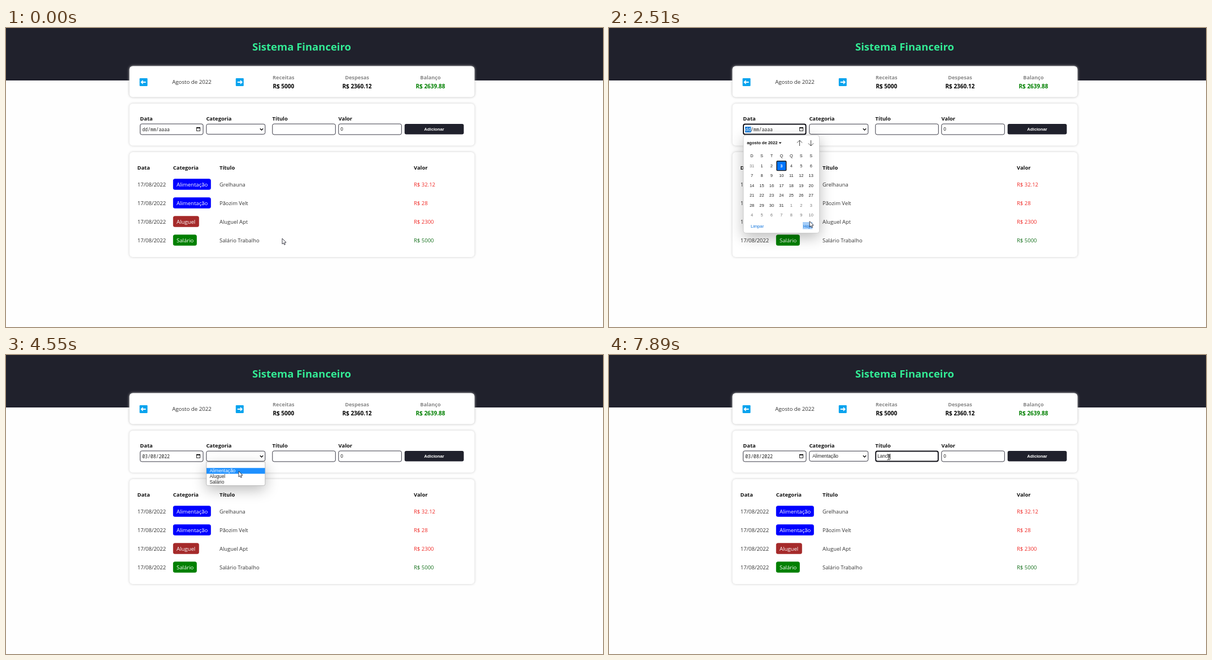
An HTML page with a canvas for the animation above (8000 ms loop, 1057 by 530 pixels).

```html
<!DOCTYPE html>
<html lang="pt">
<head>
<meta charset="utf-8">
<title>Sistema Financeiro</title>
<style>
html, body { margin: 0; width: 100%; height: 100%; overflow: hidden; background: #fefefe; }
canvas { display: block; width: 1057px; height: 530px; }
</style>
</head>
<body>
<canvas id="stage"></canvas>
<script>
const W = 1057, H = 530, LOOP = 8000, STEP = 70;
const canvas = document.getElementById('stage');
const ctx = canvas.getContext('2d');
const dpr = window.devicePixelRatio || 1;
canvas.width = W * dpr;
canvas.height = H * dpr;

const UI = '"Open Sans", "Noto Sans", sans-serif';
const ARIAL = '"Liberation Sans", Arial, sans-serif';
const MONO = '"Noto Sans Mono", monospace';
const DARK = '#20212c', INK = '#111', BLUE = '#0075ff';

// Cursor moves: start, end, destination, optional curve control point
const START = [489, 373];
const MOVES = [
  { a: 320, b: 1080, to: [325, 179] },
  { a: 1150, b: 1290, to: [338.5, 178] },
  { a: 2090, b: 2580, to: [356, 350] },
  { a: 2770, b: 3470, to: [402, 184], via: [352, 280] },
  { a: 4130, b: 4130, to: [402, 190] },
  { a: 4200, b: 4550, to: [412, 206] },
  { a: 5080, b: 5840, to: [494, 181] },
  { a: 5910, b: 5910, to: [495, 181] }
];
const CLICKS = [[1550, 1890], [2580, 2770], [3600, 3670], [5080, 5150], [5700, 5840]];
const TYPED = [[6840, 'L'], [7100, 'a'], [7560, 'n'], [7750, 'c'], [7890, 'h']];
const ROWS = [
  ['Alimentação', 67, '#0000ff', 'Grelhauna', 'R$ 32.12'],
  ['Alimentação', 67, '#0000ff', 'Pãozim Velt', 'R$ 28'],
  ['Aluguel', 46, '#a52a2a', 'Aluguel Apt', 'R$ 2300'],
  ['Salário', 42, '#008000', 'Salário Trabalho', 'R$ 5000']
];

const within = (t, a, b) => t >= a && t < b;
const smooth = k => k * k * (3 - 2 * k);

function text(str, x, y, size, color, { font = UI, weight = 400, align = 'left' } = {}) {
  ctx.font = `${weight} ${size}px ${font}`;
  ctx.textAlign = align;
  ctx.fillStyle = color;
  ctx.fillText(str, x, y);
}

function rect(x, y, w, h, r, fill) {
  ctx.beginPath();
  ctx.roundRect(x, y, w, h, r);
  ctx.fillStyle = fill;
  ctx.fill();
}

function line(points, color, width) {
  ctx.beginPath();
  points.forEach(([x, y]) => ctx.lineTo(x, y));
  ctx.strokeStyle = color;
  ctx.lineWidth = width;
  ctx.stroke();
}

function panel(x, y, w, h, r, shadow, blur, dy = 0) {
  ctx.save();
  ctx.shadowColor = shadow;
  ctx.shadowBlur = blur * dpr;
  ctx.shadowOffsetY = dy * dpr;
  rect(x, y, w, h, r, '#fff');
  ctx.restore();
}

function field(x, y, w, h, focused) {
  const lw = focused ? 1.9 : 1;
  ctx.beginPath();
  ctx.roundRect(x + lw / 2, y + lw / 2, w - lw, h - lw, 3);
  ctx.fillStyle = '#fff';
  ctx.fill();
  ctx.strokeStyle = focused ? '#101018' : '#3a3a46';
  ctx.lineWidth = lw;
  ctx.stroke();
}

function arrowIcon(cx, dir) {
  const cy = 96;
  rect(cx - 7, cy - 7, 14, 14, 1.2, '#08a3ee');
  line([[cx - 4 * dir, cy], [cx + 3 * dir, cy]], '#fff', 2);
  line([[cx + dir, cy - 3], [cx + 4 * dir, cy], [cx + dir, cy + 3]], '#fff', 1.7);
}

function drawSummary() {
  rect(0, 0, W, 93, 0, DARK);
  text('Sistema Financeiro', 523.5, 40, 18.5, '#33eb95', { weight: 700, align: 'center' });
  panel(218.5, 67.5, 611, 55, 6, '#bbb', 4);
  arrowIcon(243.5, -1);
  arrowIcon(413.8, 1);
  text('Agosto de 2022', 329, 99.3, 9.7, '#333', { align: 'center' });
  const totals = [
    [491.3, 'Receitas', 'R$ 5000', '#000'],
    [621.5, 'Despesas', 'R$ 2360.12', '#000'],
    [751.5, 'Balanço', 'R$ 2639.88', '#008000']
  ];
  for (const [x, label, value, color] of totals) {
    text(label, x, 91, 9.2, '#888', { weight: 700, align: 'center' });
    text(value, x, 107.3, 10, color, { weight: 700, align: 'center' });
  }
}

function drawDateField(t) {
  const focused = within(t, 1620, 3600);
  const value = t < 2580 ? 'dd/mm/aaaa' : '03/08/2022';
  field(237, 169.5, 112.5, 20, focused);
  text(value, 241.2, 182.8, 8.15, '#222', { font: MONO });
  if (focused) {
    rect(241, 175, 10.5, 10, 0, '#0f78d8');
    text(value.slice(0, 2), 241.2, 182.8, 8.15, '#fff', { font: MONO });
  }
  ctx.strokeStyle = INK;
  ctx.lineWidth = 0.9;
  ctx.strokeRect(337.5, 176.5, 6, 5.8);
  rect(337, 175.8, 7, 2, 0, INK);
}

function drawForm(t) {
  panel(218.5, 134, 611, 74.5, 6, '#ccc', 4);
  const bold = { weight: 700 };
  text('Data', 237.3, 163.8, 9.4, INK, bold);
  text('Categoria', 354.4, 164.4, 9.4, INK, bold);
  text('Título', 471.6, 163.8, 9.4, INK, bold);
  text('Valor', 588.6, 163.8, 9.4, INK, bold);
  drawDateField(t);

  field(354.3, 169.8, 105, 19, within(t, 5150, 5770));
  if (t >= 5150) text('Alimentação', 360.3, 182.3, 8.3, '#222', { font: ARIAL });
  line([[449.8, 178.2], [452.5, 181], [455.2, 178.2]], INK, 1.4);

  field(471.3, 169.5, 112.5, 20, t >= 5770);
  const typed = TYPED.filter(k => t >= k[0]).map(k => k[1]).join('');
  text(typed, 475.2, 182.4, 8.2, '#222', { font: ARIAL });
  if (within(t, 5770, 6240) || t >= 6840) {
    const caret = 475 + ctx.measureText(typed).width;
    rect(caret, 175, 0.9, 10, 0, INK);
  }

  field(588.3, 169.5, 112.5, 20, false);
  text('0', 592.2, 182.4, 8.2, '#222', { font: ARIAL });
  rect(705.7, 170, 104.8, 18.5, 3, DARK);
  text('Adicionar', 758, 182.2, 7.7, '#fff', { font: ARIAL, weight: 700, align: 'center' });
}

function drawTable() {
  panel(218.5, 220, 611, 186, 6, '#ccc', 4);
  const heads = [['Data', 232.5], ['Categoria', 295.8], ['Título', 378], ['Valor', 722]];
  for (const [label, x] of heads) text(label, x, 251, 9.4, INK, { weight: 700 });
  ROWS.forEach(([kind, width, color, title, value], i) => {
    const y = 281 + 33 * i;
    text('17/08/2022', 232.7, y, 9.5, '#333');
    rect(295.8, y - 13.7, width, 19.5, 3.5, color);
    text(kind, 302, y, 9.55, '#fff');
    text(title, 378, y, 9.4, '#333');
    text(value, 722, y, 9.5, i < 3 ? '#f02a26' : '#14701c');
  });
}

function drawCalendar(t) {
  panel(238, 190, 134.5, 173.5, 4, 'rgba(0,0,0,.28)', 24, 7);
  ctx.strokeStyle = '#c4c4c4';
  ctx.lineWidth = 0.7;
  ctx.stroke();
  text('agosto de 2022', 244.2, 206.2, 7.5, INK, { font: ARIAL, weight: 700 });
  ctx.beginPath();
  ctx.moveTo(300.5, 202.5);
  ctx.lineTo(305.5, 202.5);
  ctx.lineTo(303, 205.3);
  ctx.fill();
  for (const [x, d] of [[337.5, -1], [357.5, 1]]) {
    const tip = 204 + 5 * d;
    line([[x, 204 - 5 * d], [x, tip]], '#444', 1);
    line([[x - 4.5, tip - 4.5 * d], [x, tip], [x + 4.5, tip - 4.5 * d]], '#444', 1);
  }

  const cell = { font: ARIAL, align: 'center' };
  const colX = c => 253 + 17.45 * c;
  [...'DSTQQSS'].forEach((d, c) => text(d, colX(c), 229, 7.3, '#222', cell));
  for (let i = 0; i < 42; i++) {
    const x = colX(i % 7), y = 244.3 + 17.45 * Math.floor(i / 7);
    const day = i === 0 ? 31 : (i - 1) % 31 + 1;
    const outside = i === 0 || i > 31;
    const today = i === 3;
    if (today) {
      rect(x - 8.3, y - 8.3, 16.6, 16.6, 1, BLUE);
      ctx.strokeStyle = '#101010';
      ctx.lineWidth = 1.4;
      ctx.stroke();
    }
    const color = today ? '#fff' : outside ? '#777' : '#222';
    text(day, x, y + 2.7, 7.4, color, { ...cell, weight: today ? 700 : 400 });
  }
  if (t >= 2440) rect(343, 344, 17.3, 12.5, 0, '#a5cdf8');
  text('Limpar', 251, 353.7, 7.5, '#0870dc', { font: ARIAL });
  text('Hoje', 344, 353.7, 7.5, '#0870dc', { font: ARIAL });
}

function drawOptions(cursorY) {
  panel(354.8, 189.7, 104, 41.8, [0, 0, 3, 3], 'rgba(0,0,0,.28)', 24, 7);
  ctx.strokeStyle = '#aaa';
  ctx.lineWidth = 0.7;
  ctx.stroke();
  const active = cursorY > 200 ? 1 : 0;
  rect(355, 189.9 + 10.3 * active, 103.6, 10.3, 0, '#1e90ff');
  ['', 'Alimentação', 'Aluguel', 'Salário'].forEach((name, i) => {
    text(name, 360.5, 197.3 + 10.3 * i, 8.3, i === active ? '#fff' : '#222', { font: ARIAL });
  });
}

function cursorAt(t) {
  let from = START;
  for (const { a, b, to, via } of MOVES) {
    if (t < a) break;
    if (t >= b) { from = to; continue; }
    const count = Math.round((b - a) / STEP) + 1;
    const k = smooth(Math.min(1, (Math.floor((t - a) / STEP) + 1) / count));
    const mid = via || [(from[0] + to[0]) / 2, (from[1] + to[1]) / 2];
    return from.map((p, i) => (1 - k) ** 2 * p + 2 * k * (1 - k) * mid[i] + k * k * to[i]);
  }
  return from;
}

function overText(x, y) {
  const inField = y > 170 && y < 189 && (within(x, 237, 331) || within(x, 472, 583));
  const inChip = ROWS.some((r, i) => Math.abs(y - 310 - 33 * (i - 1)) < 7 && within(x, 302, 290 + r[1]));
  return inField || inChip;
}

function drawCursor(x, y, beam) {
  ctx.save();
  ctx.translate(x, y);
  if (beam) {
    ctx.globalCompositeOperation = 'difference';
    const c = '#ccc';
    line([[0, -4], [0, 4]], c, 1);
    for (const s of [-1, 1]) line([[-2.5, 4.8 * s], [-0.6, 4.6 * s], [0, 4 * s], [0.6, 4.6 * s], [2.5, 4.8 * s]], c, 1);
  } else {
    ctx.beginPath();
    [[0, 0], [0, 10], [2.3, 8], [3.8, 11.3], [5.4, 10.6], [4, 7.3], [7, 7.1]].forEach(p => ctx.lineTo(...p));
    ctx.closePath();
    ctx.fillStyle = '#fff';
    ctx.fill();
    ctx.strokeStyle = '#2a2a35';
    ctx.lineWidth = 0.9;
    ctx.stroke();
  }
  ctx.restore();
}

function draw(t) {
  ctx.setTransform(dpr, 0, 0, dpr, 0, 0);
  rect(0, 0, W, H, 0, '#fefefe');
  const [x, y] = cursorAt(t);
  const calendar = within(t, 1890, 2770);
  drawSummary();
  drawForm(t);
  drawTable();
  if (calendar) drawCalendar(t);
  if (within(t, 3670, 5150)) drawOptions(y);
  if (CLICKS.some(([a, b]) => within(t, a, b))) {
    ctx.save();
    ctx.globalCompositeOperation = 'multiply';
    ctx.beginPath();
    ctx.arc(x, y + 1.5, 7.3, 0, 2 * Math.PI);
    ctx.fillStyle = '#fbf46a';
    ctx.fill();
    ctx.restore();
  }
  drawCursor(x, y, !calendar && overText(x, y));
}

const begin = performance.now();
function tick() {
  draw((performance.now() - begin) % LOOP);
  requestAnimationFrame(tick);
}
tick();
</script>
</body>
</html>
```
